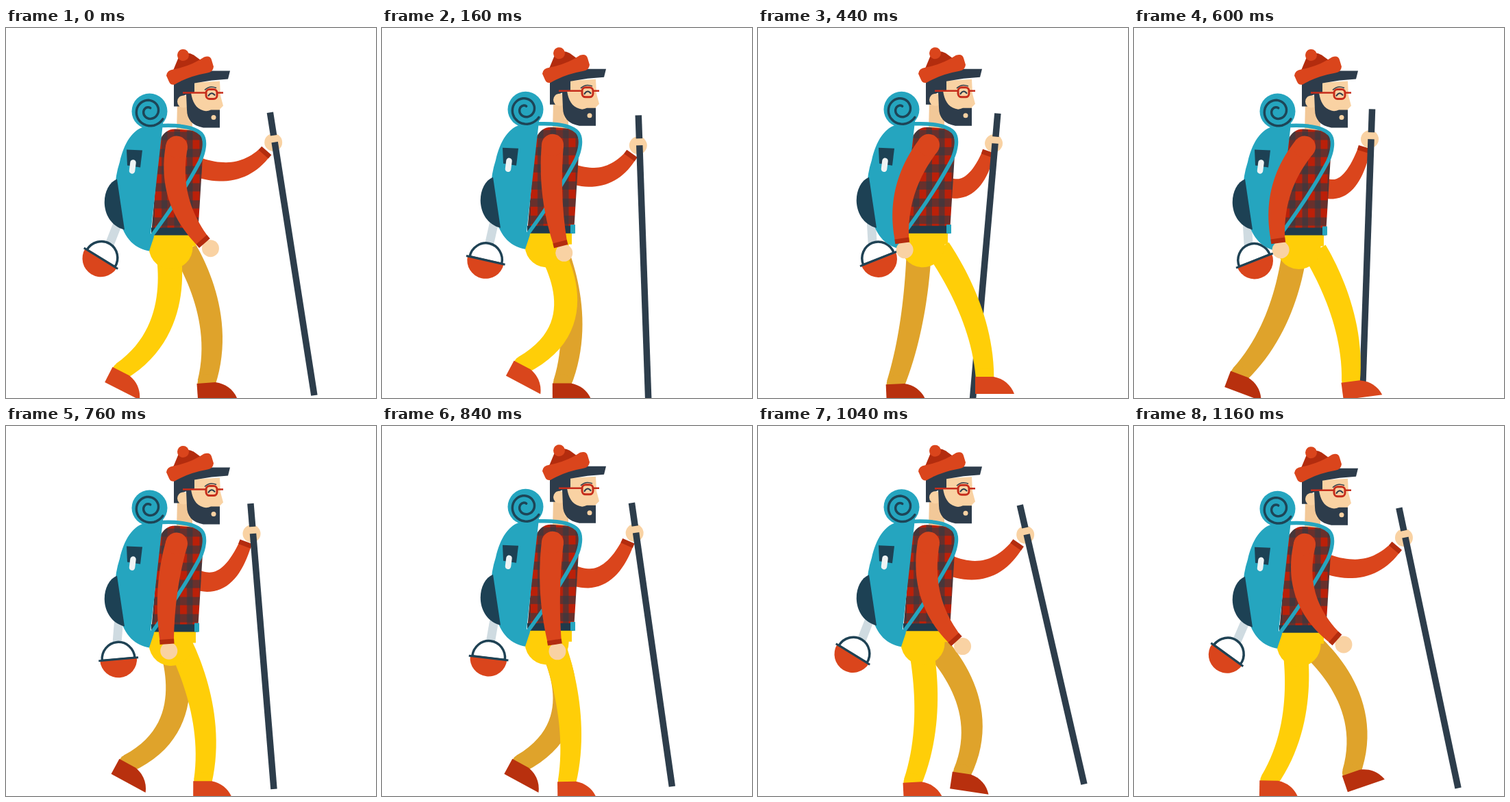
An HTML page that plays this animation: 540x540 px, repeating every 1.2 s.

```html
<!DOCTYPE html>
<html lang="en">
<head>
<meta charset="utf-8">
<title>Hiker</title>
<style>
html, body { margin: 0; width: 100%; height: 100%; overflow: hidden; background: #fff; }
svg { display: block; width: 100vw; height: 100vh; }
</style>
</head>
<body>
<svg viewBox="0 0 540 540">
  <defs>
    <pattern id="plaid" width="18.5" height="25" x="217" y="163" patternUnits="userSpaceOnUse">
      <rect width="18.5" height="25" fill="#bb2009"/>
      <rect x="10" width="8.5" height="25" fill="#303a42" opacity=".6"/>
      <rect y="13" width="18.5" height="12" fill="#303a42" opacity=".6"/>
    </pattern>
    <path id="shoe" d="M-14 0L-14 25H43C38 12 28 3 13 0Z"/>
  </defs>

  <path id="farArm" fill="#da451c"/>
  <path id="farCuff" stroke="#b32c0e" stroke-width="19"/>
  <g id="grip">
    <circle r="13" fill="#f9d2a3"/>
    <g id="stick">
      <path d="M2 -44V374" stroke="#2d3d4b" stroke-width="9.5"/>
      <path d="M-5 -10H9V0H-5Z" fill="#f9d2a3"/>
    </g>
  </g>

  <path id="farLeg" fill="#dfa32b"/>
  <g id="farFoot"><circle r="13" fill="#dfa32b"/><use href="#shoe" fill="#b8300e"/></g>
  <path id="nearLeg" fill="#ffce08"/>
  <g id="nearFoot"><circle r="13" fill="#ffce08"/><use href="#shoe" fill="#d9461c"/></g>

  <path id="tie" stroke="#cfdbe1" stroke-width="13"/>
  <g id="mug">
    <path d="M-24 42A24 25 0 0 1 24 42Z" fill="#fff" stroke="#1f4254" stroke-width="3.5"/>
    <path d="M-27 42A27 27 0 0 0 27 42Z" fill="#da451c"/>
    <path d="M-29 42H29" stroke="#1f4254" stroke-width="3"/>
  </g>

  <g id="body">
    <path d="M214 299H277V318H272.500A32 32 0 1 1 209 314Z" fill="#ffce08"/>
    <path d="M250 110H272V152H249Z" fill="#f2c898"/>
    <path d="M212 300L224 164Q232 146 248 147L283 150Q289 160 287 188L280 300Z" fill="url(#plaid)"/>
    <path d="M212 291H280V302H212Z" fill="#203a4b"/>
    <path d="M275 289H282V302H275Z" fill="#25a5bf"/>
    <path d="M228 142C255 141 275 144 285 154C293 163 289 181 283 194C265 228 240 266 211 305" fill="none" stroke="#25a5bf" stroke-width="5.5"/>
    <path d="M231 120L228 148L211 300L216 304L209 325C190 322 172 308 166 278C157 250 157 222 166 195C172 168 185 146 205 143Z" fill="#25a5bf"/>
    <circle cx="209.500" cy="121" r="26" fill="#25a5bf"/>
    <path id="spiral" fill="none" stroke="#1d4557" stroke-width="3.500" stroke-linecap="round"/>
    <path d="M162 220C137 230 135 284 173 294Z" fill="#1d4154"/>
    <path d="M176 177L199 178L196 203L177 200Z" fill="#1d4154"/>
    <path d="M185.500 196L184 208" stroke="#eef3f4" stroke-width="8.500" stroke-linecap="round"/>

    <path d="M261 80L312 77L313 98L317 113L312 118V135H266Z" fill="#f9d2a3"/>
    <path d="M245 75L298 62H327L324 74L300 76L275 80V93L262 97L254 101L253 114H245Z" fill="#2d3c4b"/>
    <circle cx="259" cy="107" r="9" fill="#f9d2a3"/>
    <path d="M263 96L270 94C272 107 277 117 288 120Q293 122 299 119H312V145H288C272 142 264 133 264 119Z" fill="#2d3c4b"/>
    <circle cx="303" cy="130" r="3.500" fill="#f9d2a3"/>
    <g fill="none">
      <path d="M258 94H293M308 94H317" stroke="#c62d1b" stroke-width="2.500"/>
      <rect x="292" y="89" width="16" height="14" rx="5" stroke="#c62d1b" stroke-width="3"/>
      <path d="M295 99Q300 91 305 98" stroke="#2d3c4b" stroke-width="2"/>
      <path d="M290 90Q297 83 307 87" stroke="#2d3c4b" stroke-width="1.500"/>
    </g>
    <path d="M242 66L252 42Q262 32 274 39L289 50Z" fill="#b32c0e"/>
    <circle cx="258.500" cy="39" r="8.500" fill="#da451c"/>
    <path d="M234 69Q235 61 244 60Q270 55 289 42Q298 39 300 46L303 56Q302 64 294 65Q266 70 246 82Q240 83 238 78Z" fill="#da451c"/>
  </g>

  <circle id="nearHand" r="12.500" fill="#f9d2a3"/>
  <path id="nearArm" fill="#da451c"/>
  <circle id="shoulder" r="16" fill="#da451c"/>
  <path id="nearCuff" stroke="#b32c0e" stroke-width="21"/>
</svg>
<script>
const LOOP = 1200, STEP = 40;
const STRIDE = 1260;  // a full stride is longer than the loop, so the loop restarts with a cut
const LEG = 200.5;
const $ = id => document.getElementById(id);
const set = (id, name, value) => $(id).setAttribute(name, value);
const move = (id, x, y, turn = 0) => set(id, 'transform', `translate(${x} ${y}) rotate(${turn})`);
const rad = deg => deg * Math.PI / 180;

// Swings between -1 and 1 and is 1 at time peak.
const wave = (t, peak, period = STRIDE) => Math.cos(2 * Math.PI * (t - peak) / period);

// Ankle path of one stride: time, x, y, foot tilt.
const gait = [
  [0, 168, 501, 27], [160, 205, 492, 28], [340, 270, 499, 26], [440, 331, 509, 0],
  [530, 335, 506, -19], [610, 314, 517, -6], [700, 300, 518, 0], [1150, 200, 518, 0]
];

// Smooth closed curve through the gait points.
function ankle(t) {
  const n = gait.length, time = (t + STRIDE) % STRIDE;
  const key = k => {
    const turn = Math.floor(k / n), [at, ...rest] = gait[k - turn * n];
    return [at + turn * STRIDE, ...rest];
  };
  let i = 0;
  while (key(i + 1)[0] <= time) i++;
  const [p, a, b, q] = [-1, 0, 1, 2].map(d => key(i + d));
  const span = b[0] - a[0], u = (time - a[0]) / span, v = 1 - u;
  return [1, 2, 3].map(j => {
    const m0 = (b[j] - p[j]) / (b[0] - p[0]) * span;
    const m1 = (q[j] - a[j]) / (q[0] - a[0]) * span;
    return a[j] * v * v * (1 + 2 * u) + b[j] * u * u * (3 - 2 * u) + m0 * u * v * v - m1 * u * u * v;
  });
}

// Tapered limb along a cubic curve; w0 and w1 are half widths.
function limb(p, c1, c2, q, w0, w1) {
  const left = [], right = [], n = 24;
  for (let i = 0; i <= n; i++) {
    const u = i / n, v = 1 - u;
    const pt = k => v * v * v * p[k] + 3 * v * v * u * c1[k] + 3 * v * u * u * c2[k] + u * u * u * q[k];
    const dir = k => v * v * (c1[k] - p[k]) + 2 * v * u * (c2[k] - c1[k]) + u * u * (q[k] - c2[k]);
    const x = pt(0), y = pt(1), dx = dir(0), dy = dir(1);
    const w = (w0 + (w1 - w0) * u * u) / Math.hypot(dx, dy);
    left.push((x - dy * w).toFixed(2) + ' ' + (y + dx * w).toFixed(2));
    right.unshift((x + dy * w).toFixed(2) + ' ' + (y - dx * w).toFixed(2));
  }
  return 'M' + left.concat(right).join('L') + 'Z';
}

// The leg keeps its length: the closer the foot is to the hip, the more the knee bends.
function leg(name, t, bob, shift) {
  const [x, y, tilt] = ankle(t), foot = [x + shift, y];
  const hip = [250 + 15 * wave(t, 530) + shift / 12, 325 + bob];
  const dx = foot[0] - hip[0], dy = foot[1] - hip[1], d = Math.hypot(dx, dy);
  const bend = .41 * Math.sqrt(Math.max(0, LEG * LEG - d * d)) / d;
  const at = (along, out) => [
    hip[0] + dx * along + dy * out * bend,
    hip[1] + dy * along - dx * out * bend
  ];
  set(name + 'Leg', 'd', limb(hip, at(.21, .8), at(.61, 1.87), foot, 18, 13.3));
  move(name + 'Foot', ...foot, tilt);
}

// Draws sleeve and cuff through the elbow, returns the direction at the wrist.
function arm(name, s, elbow, w, w0, w1) {
  const mid = [0, 1].map(i => 2 * elbow[i] - (s[i] + w[i]) / 2);
  const toward = p => [0, 1].map(i => p[i] + (mid[i] - p[i]) * 2 / 3);
  set(name + 'Arm', 'd', limb(s, toward(s), toward(w), w, w0, w1));
  const d = [w[0] - mid[0], w[1] - mid[1]], len = Math.hypot(...d);
  const dir = d.map(v => v / len);
  set(name + 'Cuff', 'd', `M${w[0] - dir[0] * 5} ${w[1] - dir[1] * 5}L${w[0] + dir[0] * 2} ${w[1] + dir[1] * 2}`);
  return dir;
}

function draw(t) {
  const bob = -1.75 + 2.25 * wave(t, 615, STRIDE / 2);
  const swing = wave(t, 1150);
  move('body', 0, bob);
  leg('near', t, bob, 0);
  leg('far', t - STRIDE / 2, bob, -18);

  const grip = [368 + 26 * swing, 164 - 8 * wave(t, 870)];
  const farWrist = [grip[0] - 9.5 - 2 * swing, grip[1] + 13.5];
  arm('far', [270, 214 - 17 * swing], [320 + 13 * swing, 218 - 11 * swing], farWrist, 14.5, 9);
  move('grip', ...grip);
  move('stick', 0, 0, -4 - 9 * wave(t, 1060));

  const shoulder = [249, 173 + bob];
  const elbow = [245 + 20 * swing - 14 * swing * swing, 243 + 5 * swing];
  const wrist = [251 + 44 * swing, 317 - 6 * swing * swing];
  const dir = arm('near', shoulder, elbow, wrist, 16, 10);
  move('shoulder', ...shoulder);
  move('nearHand', wrist[0] + dir[0] * 12 + 2, wrist[1] + dir[1] * 12);

  const hang = 6 + 30 * swing, pivot = [160.5, 300 + bob];
  move('mug', ...pivot, hang);
  set('tie', 'd', `M165 ${280 + bob}L${pivot[0] - 18 * Math.sin(rad(hang))} ${pivot[1] + 18 * Math.cos(rad(hang))}`);
}

const coil = [];
for (let i = 0; i <= 60; i++) {
  const u = i / 60, a = rad(30 + 620 * u), r = 23 - 18 * u;
  coil.push((209 + r * Math.cos(a)).toFixed(1) + ' ' + (121 + r * Math.sin(a)).toFixed(1));
}
set('spiral', 'd', 'M' + coil.join('L'));

const start = performance.now();
function tick() {
  const t = (performance.now() - start) % LOOP;
  draw(Math.floor(t / STEP) * STEP);
  requestAnimationFrame(tick);
}
draw(0);
requestAnimationFrame(tick);
</script>
</body>
</html>
```
